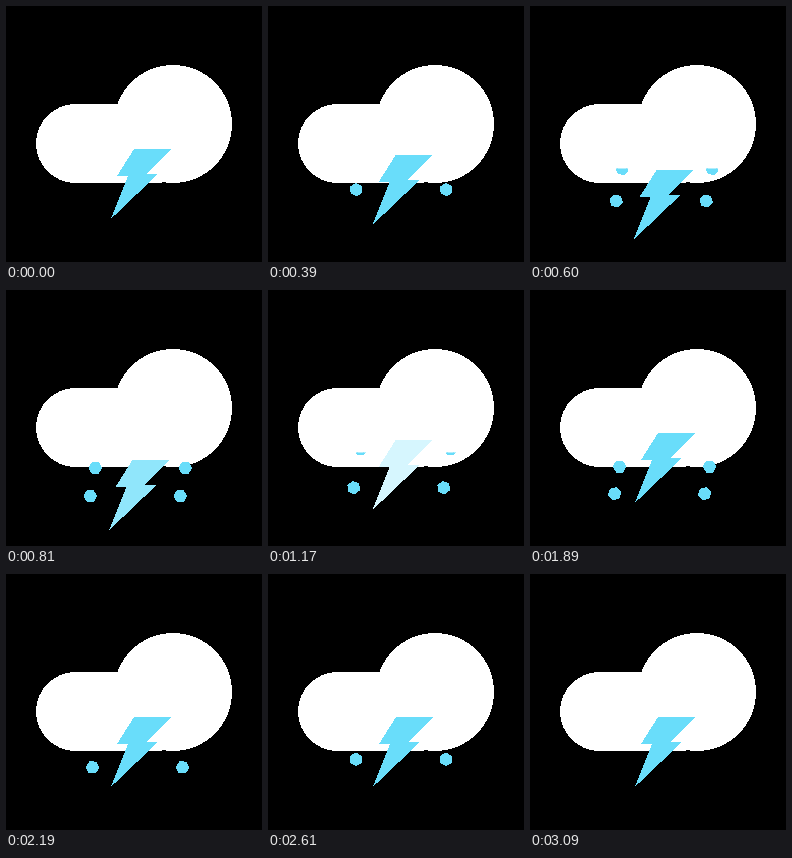
An HTML page that plays this animation: 256 px wide and 256 px high, repeating every 3120 ms.

```html
<!DOCTYPE html>
<html lang="en">
<head>
<meta charset="utf-8">
<title>Hail storm</title>
<style>
  html, body { margin: 0; width: 100%; height: 100%; overflow: hidden; background: #000; }
  svg { display: block; width: 100vw; height: 100vh; shape-rendering: crispEdges; }
  polygon { fill: #69ddfa; stroke: #69ddfa; stroke-width: 2; stroke-linejoin: round; }
</style>
</head>
<body>
<svg viewBox="0 0 256 256">
  <clipPath id="below"><rect y="162.5" width="256" height="94"/></clipPath>
  <g fill="#fff">
    <rect x="30" y="98" width="160" height="79" rx="39.5"/>
    <circle cx="167" cy="118" r="59"/>
  </g>
  <g id="hail" clip-path="url(#below)"></g>
  <path id="bolt" d="M128 143H165L140 168H152L104.8 213L122 170H111Z"/>
</svg>
<script>
const LOOP = 3120, STEP = 30, LIFE = 900;
const BIRTHS = [0, 520, 1125, 1620, 2190];
const bolt = document.getElementById('bolt');
const hail = document.getElementById('hail');

const clamp = v => Math.max(0, Math.min(1, v));
const part = (t, from, to) => clamp((t - from) / (to - from));
const ease = u => u * u * (3 - 2 * u);
const tint = k => `rgb(${[105, 221, 250].map(c => Math.round(255 - (255 - c) * k))})`;

const hexagon = Array.from({ length: 6 }, (_, i) => {
  const a = i * Math.PI / 3;
  return `${5.7 * Math.cos(a)},${5.7 * Math.sin(a)}`;
}).join(' ');

// Each birth drops two stones side by side.
const stones = BIRTHS.flatMap(birth => [0, 90].map(dx => {
  const el = document.createElementNS('http://www.w3.org/2000/svg', 'polygon');
  el.setAttribute('points', hexagon);
  hail.append(el);
  return { el, birth, dx };
}));

function drawStone({ el, birth, dx }, t) {
  const age = t - birth;
  const alive = age > 0 && age < LIFE;
  el.style.display = alive ? '' : 'none';
  if (!alive) return;
  const y = 163.6 + 0.0524 * age - 10 * Math.exp(-age / 120);
  const x = 91.8 - 0.18 * (y - 164) + dx;
  const spin = (age - 280) / 270 * 60;
  el.setAttribute('transform', `translate(${x} ${y}) rotate(${spin})`);
  el.setAttribute('opacity', 1 - part(age, 830, LIFE));
}

function drawBolt(t) {
  const fall = t < 690 ? part(t, 144, 690) ** 2 : 1 - ease(part(t, 680, 1400));
  const glow = t < 1030 ? 1 - ease(part(t, 700, 1030)) : ease(part(t, 1030, 1440));
  bolt.setAttribute('transform', `translate(${-2 * fall} ${30 * fall})`);
  bolt.setAttribute('fill', tint(glow));
}

const start = performance.now();
function frame() {
  const t = Math.floor((performance.now() - start) % LOOP / STEP) * STEP;
  stones.forEach(s => drawStone(s, t));
  drawBolt(t);
  requestAnimationFrame(frame);
}
frame();
</script>
</body>
</html>
```
